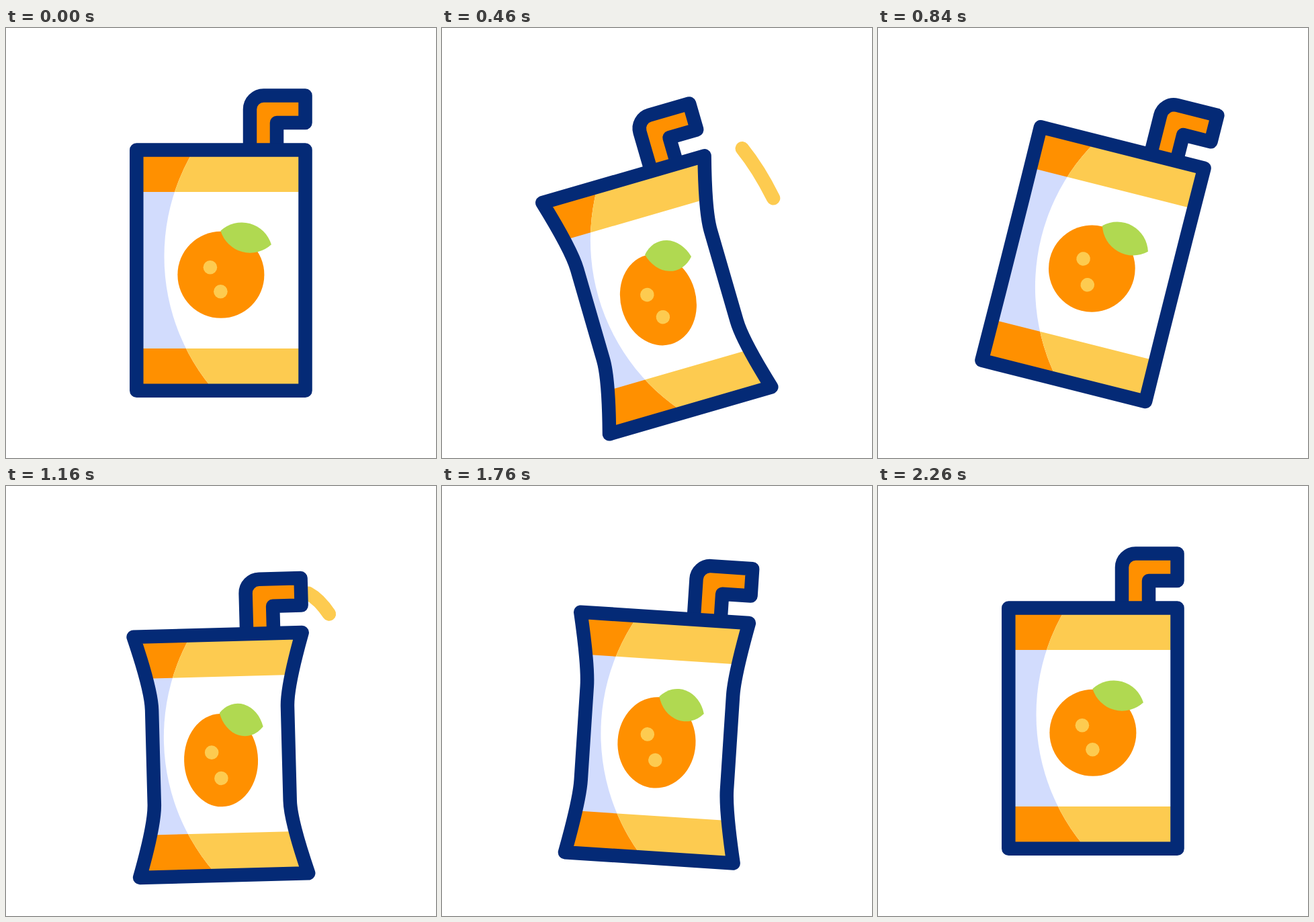
Write an HTML page that moves like this. It is 640 px wide and 640 px high and loops after 3020 ms.

```html
<!DOCTYPE html>
<html lang="en">
<head>
<meta charset="utf-8">
<title>Juice box</title>
<style>
  html, body { margin: 0; width: 100%; height: 100%; overflow: hidden; background: #fff; }
  svg { display: block; width: 100%; height: 100%; }
  .line { stroke: #042a76; stroke-width: 20.5; stroke-linejoin: round; stroke-linecap: round; }
  .orange { fill: #ff9000; }
  .yellow { fill: #fdcb50; }
</style>
</head>
<body>
<svg viewBox="0 0 640 640">
  <defs>
    <clipPath id="boxClip"><path id="clipShape"/></clipPath>
    <clipPath id="lightClip"><circle cx="541.5" cy="340" r="306"/></clipPath>
  </defs>
  <g id="pack">
    <path id="juice" d="M440 118C506 126 545 300 532 398" pathLength="1" fill="none"
          stroke="#fdcb50" stroke-width="20.5" stroke-linecap="round"/>
    <path class="line orange" d="M363 181V121A20.5 20.5 0 0 1 383.5 100.5H445.5V141H403V181"/>
    <g clip-path="url(#boxClip)">
      <rect x="184" y="171" width="272" height="380" fill="#d2dcfd"/>
      <path class="orange" d="M184 171H456V244H184ZM184 477H456V551H184Z"/>
      <g clip-path="url(#lightClip)">
        <rect x="184" y="171" width="272" height="380" fill="#fff"/>
        <path class="yellow" d="M184 171H456V244H184ZM184 477H456V551H184Z"/>
      </g>
    </g>
    <g id="fruit">
      <circle class="orange" r="64.5"/>
      <path fill="#b0d951" d="M-.5-65.5A46 46 0 0 1 75-45A46 46 0 0 1-.5-65.5Z"/>
    </g>
    <circle class="yellow" id="spotA" r="10.3"/>
    <circle class="yellow" id="spotB" r="10.3"/>
    <path id="outline" class="line" fill="none"/>
  </g>
</svg>
<script>
const LOOP = 3020, END = 2260, CYCLE = END / 3;
const $ = id => document.getElementById(id);
const linear = x => x;
const sine = x => (1 - Math.cos(Math.PI * x)) / 2;

// Keys are [time, value] pairs
function track(keys, t, ease = sine) {
  if (t <= keys[0][0]) return keys[0][1];
  for (let i = 1; i < keys.length; i++) {
    const [t0, v0] = keys[i - 1], [t1, v1] = keys[i];
    if (t < t1) return v0 + (v1 - v0) * ease((t - t0) / (t1 - t0));
  }
  return keys[keys.length - 1][1];
}

const TILT = [[0, 0], [370, -18.5], [900, 15.2], [1300, -7.8], [1700, 3.9], [2150, 0]];
const DROP = [[0, 0], [350, 55], [718, -35], [1060, 57], [1385, -22.5], [1770, 14], [2150, 0]];
const SQUEEZE = [[60, 0], [377, 1], [CYCLE, 0]];
const HEAD = [[385, 0], [407, 0.2], [460, 0.59], [540, 0.83], [620, 1]];
const TAIL = [[395, 0], [460, 0.31], [727, 0.87], [790, 1]];

// Straight waist with flared ends
function boxPath(inset) {
  const left = 194.3 + inset, right = 445.5 - inset;
  return `M194.3 181.5H445.5Q${right} 261 ${right} 291V431Q${right} 461 445.5 539.8` +
         `H194.3Q${left} 461 ${left} 431V291Q${left} 261 194.3 181.5Z`;
}

function drawJuice(t) {
  // A squirt may outlast its own cycle by a few steps
  const index = Math.floor(Math.max(0, t - 60) / CYCLE);
  const local = t - index * CYCLE;
  const reach = index === 2 ? 0.58 : 1;
  const head = track(HEAD, local, linear) * reach;
  const tail = track(TAIL, local, linear) * reach;
  const visible = t < END && head > 0 && tail < reach;
  $('juice').style.display = visible ? '' : 'none';
  $('juice').setAttribute('stroke-dasharray', `${Math.max(0.001, head - tail)} 3`);
  $('juice').setAttribute('stroke-dashoffset', -tail);
}

function draw(t) {
  const tilt = track(TILT, t), drop = track(DROP, t);
  const squeeze = t < END ? track(SQUEEZE, t % CYCLE) : 0;
  const sx = 1 - 0.15 * squeeze, sy = 1 + 0.075 * squeeze;
  const shape = boxPath(25 * squeeze);

  $('pack').setAttribute('transform', `translate(0 ${drop}) rotate(${tilt} 320 361)`);
  $('outline').setAttribute('d', shape);
  $('clipShape').setAttribute('d', shape);
  $('fruit').setAttribute('transform', `translate(319.9 ${367.3 + squeeze}) scale(${sx} ${sy})`);
  for (const [id, x, y] of [['spotA', -16, -11], ['spotB', -0.5, 25]]) {
    $(id).setAttribute('cx', 319.9 + x * sx);
    $(id).setAttribute('cy', 367.3 + squeeze + y * sy);
  }
  drawJuice(t);
}

const start = performance.now();
function frame() {
  const t = (performance.now() - start) % LOOP;
  draw(Math.floor(t / 20) * 20);
  requestAnimationFrame(frame);
}
frame();
</script>
</body>
</html>
```
